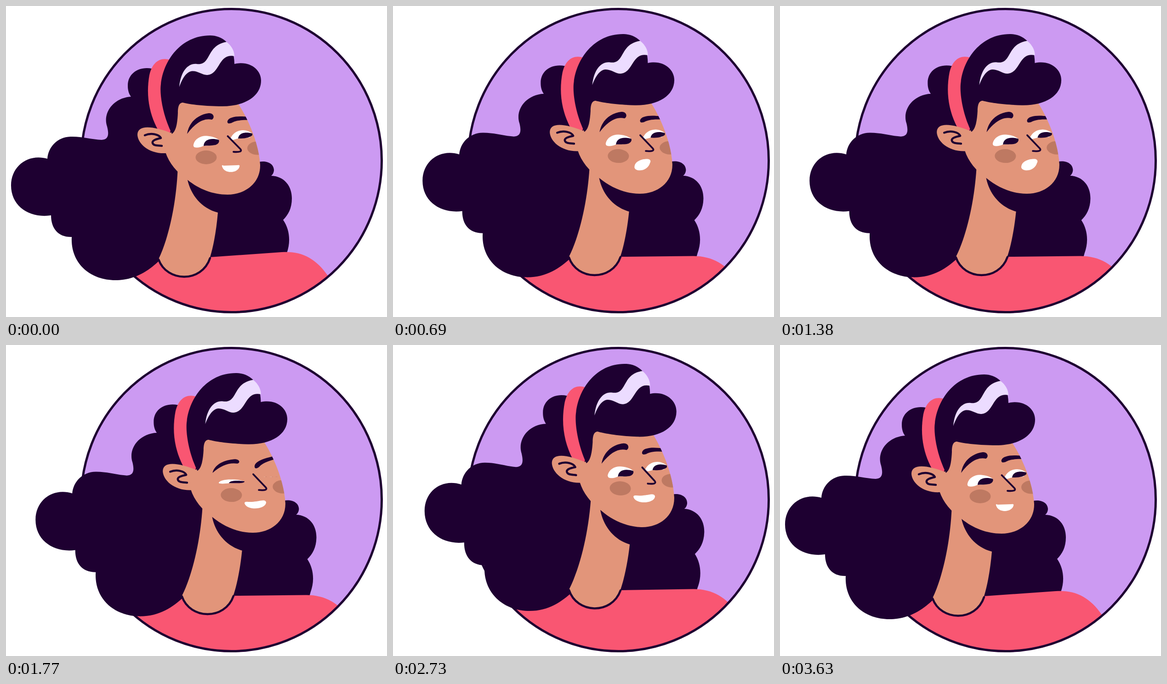
An HTML page that plays this animation: 829 px wide and 676 px high, repeating every 3.66 s.

```html
<!DOCTYPE html>
<html lang="en">
<head>
<meta charset="utf-8">
<title>Talking portrait</title>
<style>
html, body { margin: 0; width: 100%; height: 100%; overflow: hidden; background: #fff; }
svg { display: block; width: 829px; height: 676px; }
.dark { fill: #1e0031; }
.skin { fill: #e2957a; }
.pink { fill: #f95672; }
.blush { fill: #be7962; }
.white { fill: #fff; }
.line { fill: none; stroke: #1e0031; stroke-width: 4.5; stroke-linecap: round; stroke-linejoin: round; }
</style>
</head>
<body>
<svg viewBox="0 0 829 676">
  <defs>
    <clipPath id="disc"><ellipse cx="490.5" cy="336" rx="327" ry="329.5"/></clipPath>
    <path id="faceShape" d="M372 205H500C524 238 550 296 553 345C554 385 520 410 482 410C450 410 420 398 395 378C372 362 355 342 347 318L360 270Z"/>
    <clipPath id="face"><use href="#faceShape"/></clipPath>
  </defs>

  <ellipse cx="490.5" cy="336" rx="327" ry="329.5" fill="#cc9af2"/>

  <g data-part="lock">
    <path class="dark" d="M540 342C562 333 582 340 583 356C583 362 580 367 577 369C606 370 622 392 622 418C622 440 614 454 603 465C617 485 620 512 611 537L600 580H430L390 370Z"/>
  </g>
  <g clip-path="url(#disc)">
    <g data-part="shirt">
      <path class="pink" d="M150 660C200 590 250 540 300 532L332 530L443 546L600 535C642 532 674 548 700 586L780 720H150Z"/>
    </g>
  </g>
  <ellipse class="line" style="stroke-width:5" cx="490.5" cy="336" rx="327" ry="329.5"/>

  <g data-part="hair">
    <path class="dark" d="M330 140C298 126 264 142 265 174C265 184 268 192 272 197C232 200 210 234 220 262C224 278 224 290 208 291C186 290 164 283 140 284C112 285 92 306 90 332C48 320 11 348 11 390C11 436 52 462 98 455C98 484 114 503 143 502C140 560 184 596 238 596C282 596 312 574 334 553L400 552L440 300L400 150Z"/>
  </g>

  <g data-part="torso">
    <path class="skin" d="M374 345C372 420 356 500 332 550C352 602 428 602 444 546C452 520 458 485 461 449C425 440 402 410 395 378V345Z"/>
    <path class="line" d="M332 551C350 601 426 602 444 548"/>
  </g>

  <g data-part="head">
    <use href="#faceShape" class="skin"/>
    <path class="pink" d="M360 118C336 109 318 122 312 150C304 195 312 235 331 270L356 279L375 200Z"/>
    <path class="skin" d="M348 320C312 322 287 300 286 280C286 258 318 260 362 277L370 320Z"/>
    <path class="line" d="M302 281C316 275 333 279 337 287C328 289 317 292 319 298C321 304 330 303 339 304"/>
    <path class="dark" d="M361 278C340 235 334 190 337 170C342 120 380 64 444 64C470 64 497 82 497 126C530 118 555 138 555 162C555 196 520 218 470 218C435 218 400 214 385 210C376 210 374 220 374 232C373 255 370 272 361 278Z"/>
    <path fill="#ecdcff" d="M377 176C380 142 396 124 415 126C448 130 434 86 480 78C490 86 497 97 497 109C462 102 466 148 438 150C420 151 398 118 377 176Z"/>

    <g clip-path="url(#face)">
      <ellipse class="blush" cx="435.5" cy="329" rx="23" ry="15"/>
      <ellipse class="blush" cx="547" cy="309" rx="22" ry="14.5"/>
      <path id="browL" class="dark" d="M394 278C398 252 418 236 441 233C452 232 455 243 448 247C430 243 412 254 394 278Z"/>
      <path id="browR" class="dark" d="M487 255C479 257 480 246 490 243C502 239 512 240 530 241V248C510 247 498 250 493 253Q490 255 487 255Z"/>
      <g id="eyeL">
        <path class="white" d="M408 301C411 288 426 280 442 283C452 284 460 288 463 291L456 302L430 304C424 307 415 309 410 307Q407 305 408 301Z"/>
        <path class="dark" d="M430 304C431 291 444 286 463 291C465 295 462 300 456 302C446 304 438 303 430 304Z"/>
      </g>
      <g id="eyeR">
        <path class="white" d="M488 290C491 279 502 270 516 270C524 270 530 273 536 277L530 286L505 288C497 290 490 293 488 290Z"/>
        <path class="dark" d="M505 288C506 278 517 272 536 277V281C528 288 514 288 505 288Z"/>
      </g>
      <path id="mouth" class="white"/>
    </g>
    <path class="line" style="stroke-width:3.8" d="M482.5 283L510 311C514 316 509 318 495 317"/>
  </g>
</svg>

<script>
const LOOP = 3660;
const $ = id => document.getElementById(id);
const add = (p, q, k) => p.map((v, i) => v + k * q[i]);

// Each warp: [x shift, x by x, x by y, y shift, y by x, y by y] around (425, 240).
const rest = [0, 0, 0, 0, 0, 0];
const upper = {
  right: [55.9, .002, -.012, -3.2, .019, .001],
  high: [60.4, .001, -.015, -19.7, .033, .022]
};
const lower = {
  right: [55.9, .002, -.016, -3.2, .019, .001],
  high: [60.4, .001, -.03, -19.7, .033, .014]
};
const poses = {
  head: {
    ...upper,
    low: [32.3, -.002, -.082, 36.2, .095, -.068],
    rising: [36, .003, -.038, 26, .037, -.024]
  },
  hair: {
    ...upper,
    low: [38, 0, -.135, 28, .11, -.06],
    rising: [37.5, .002, -.045, 24.7, .02, -.031]
  },
  lock: {
    ...lower,
    low: [13.5, 0, -.01, 31, 0, -.04],
    rising: [33, 0, -.025, 24.5, 0, 0]
  },
  torso: {
    ...lower,
    low: [26, .018, -.058, 33, .09, -.052],
    rising: [37, .003, -.041, 26, .037, -.026]
  },
  shirt: {
    right: [52, 0, 0, -2, .06, 0],
    high: [52, 0, 0, -14, .054, 0],
    low: [10, 0, 0, 16, .024, 0],
    rising: [27, 0, 0, 20.4, .036, 0]
  }
};

function bodyTrack({ right, high, low, rising }) {
  const lift = add(high, right, -1);
  const leanLeft = k => add(add(rest, lift, k), [-8, 0, 0, 0, 0, 0], k);
  return [
    [0, rest], [110, leanLeft(1)], [380, low], [450, rising],
    [570, add(right, lift, .5)], [690, right], [2610, right],
    [2730, high], [3060, low], [3220, leanLeft(.5)],
    [3380, rest], [LOOP, rest]
  ];
}

// Left brow: scale, drop. Right brow: turn, drop. Eye openness: left, right.
const calm = [1, 0, 0, 0, 1, 1];
const tense = [.8, 0, 0, 0, 1, 1];
const wink = [.68, 4, -18, 4, .38, 0];
const moodTrack = [
  [0, calm], [150, calm], [400, tense], [480, tense], [640, calm], [1590, calm],
  [1700, wink], [2080, wink], [2220, calm], [LOOP, calm]
];

// Start point followed by four cubic curves.
const smile = [470, 348, 469, 346, 471, 346, 474, 347, 484, 347, 495, 346, 504, 346,
  508, 345, 509, 347, 508, 349, 505, 364, 474, 366, 470, 348];
const open = [470, 352, 471, 345, 474, 341, 479, 338, 486, 334, 492, 333, 498, 333,
  504, 333, 507, 337, 504, 342, 498, 365, 470, 364, 470, 352];
const flat = [472, 351, 472, 347, 475, 346, 480, 345, 486, 343, 492, 343, 499, 342,
  506, 341, 509, 344, 506, 348, 502, 353, 472, 356, 472, 351];
const grin = [465, 348, 463, 344, 466, 343, 470, 343, 482, 344, 494, 341, 500, 340,
  508, 338, 512, 341, 511, 345, 508, 359, 472, 362, 465, 348];
const mouthTrack = [
  [0, smile], [150, smile], [280, flat], [410, open], [480, open], [600, flat],
  [720, open], [840, grin], [970, flat], [1050, flat], [1170, open], [1290, flat],
  [1410, open], [1550, flat], [1680, grin], [2740, grin], [2920, smile], [LOOP, smile]
];

// Smooth interpolation without overshoot between keys.
function sample(track, t) {
  let i = 0;
  while (i < track.length - 2 && t >= track[i + 1][0]) i++;
  const [t0, a] = track[i], [t1, b] = track[i + 1];
  const h = t1 - t0, u = (t - t0) / h;
  const slope = (j, n) => {
    const p = track[j], q = track[j + 1];
    return p && q ? (q[1][n] - p[1][n]) / (q[0] - p[0]) : 0;
  };
  const tangent = (j, n) => {
    const d = slope(j - 1, n), e = slope(j, n);
    return d * e > 0 ? 2 * d * e / (d + e) : 0;
  };
  return a.map((v, n) => {
    const m0 = tangent(i, n) * h, m1 = tangent(i + 1, n) * h, s = u * u * (3 - 2 * u);
    return v + (b[n] - v) * s + m0 * u * (1 - u) * (1 - u) - m1 * u * u * (1 - u);
  });
}

function matrix([ax, bx, cx, ay, by, cy]) {
  const e = ax - 425 * bx - 240 * cx, f = ay - 425 * by - 240 * cy;
  return `matrix(${1 + bx} ${by} ${cx} ${1 + cy} ${e} ${f})`;
}

const squash = (k, y, drop = 0) => `translate(0 ${y * (1 - k) + drop}) scale(1 ${k})`;
const set = (el, value) => el.setAttribute('transform', value);

const parts = Object.keys(poses).map(name => ({
  track: bodyTrack(poses[name]),
  node: document.querySelector(`[data-part=${name}]`)
}));

function draw(t) {
  for (const { track, node } of parts) set(node, matrix(sample(track, t)));
  const [scale, drop, turn, dropR, eyeL, eyeR] = sample(moodTrack, t);
  set($('browL'), squash(scale, 277, drop));
  set($('browR'), `translate(0 ${dropR}) rotate(${turn} 521 246)`);
  set($('eyeL'), squash(eyeL, 303));
  set($('eyeR'), squash(eyeR, 288));
  const m = sample(mouthTrack, t);
  $('mouth').setAttribute('d', `M${m.slice(0, 2)}C${m.slice(2)}Z`);
}

const start = performance.now();
function tick() {
  draw((performance.now() - start) % LOOP);
  requestAnimationFrame(tick);
}
draw(0);
requestAnimationFrame(tick);
</script>
</body>
</html>
```
